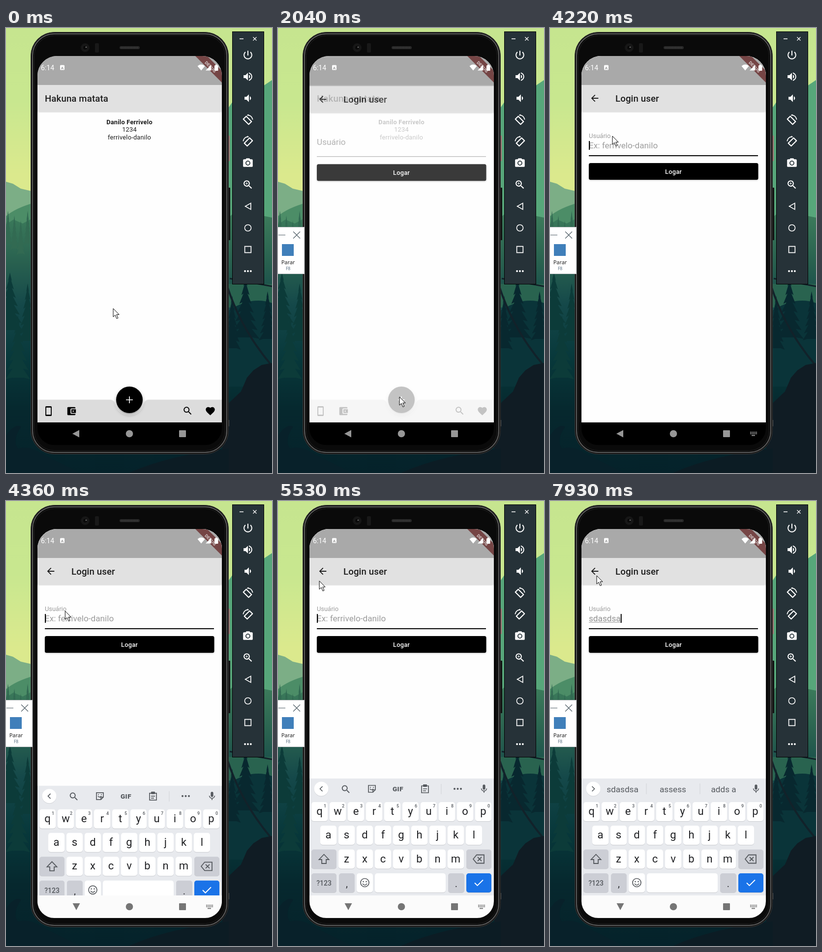
These frames come from a looping animation (541x906 px, 8 s). An HTML page:

```html
<!DOCTYPE html>
<html lang="pt">
<head>
<meta charset="utf-8">
<title>Login</title>
<style>
html, body { margin: 0; width: 100%; height: 100%; overflow: hidden; background: #05232b; }
svg { display: block; font-family: Roboto, sans-serif; }
.mid { text-anchor: middle; }
</style>
</head>
<body>
<svg id="stage" width="541" height="906" viewBox="0 0 541 906"></svg>
<script>
const stage = document.getElementById('stage');
const rect = (x, y, w, h, fill, r = 0, more = '') =>
  `<rect x="${x}" y="${y}" width="${w}" height="${h}" rx="${r}" fill="${fill}" ${more}/>`;
const circle = (x, y, r, fill, more = '') => `<circle cx="${x}" cy="${y}" r="${r}" fill="${fill}" ${more}/>`;
const path = (d, fill, more = '') => `<path d="${d}" fill="${fill}" ${more}/>`;
const line = (d, color, w = 1, more = '') => path(d, 'none', `stroke="${color}" stroke-width="${w}" ${more}`);
const text = (s, x, y, size, fill, more = '') =>
  `<text x="${x}" y="${y}" font-size="${size}" fill="${fill}" ${more}>${s}</text>`;
const mid = (s, x, y, size, fill, more = '') => text(s, x, y, size, fill, 'class="mid" ' + more);
// 24-unit icon centred on x, y
const icon = (body, x, y, size, fill) =>
  `<g transform="translate(${x} ${y}) scale(${size / 24}) translate(-12 -12)" fill="${fill}">${body}</g>`;
const glyph = d => `<path d="${d}"/>`;

const lens = glyph('M15.5 14h-.79l-.28-.27C15.41 12.59 16 11.11 16 9.5 16 5.91 13.09 3 9.5 3S3 5.91 3 9.5 5.91 16 9.5 16c1.61 0 3.09-.59 4.23-1.57l.27.28v.79l5 4.99L20.49 19l-4.99-5zm-6 0C7.01 14 5 11.99 5 9.5S7.01 5 9.5 5 14 7.01 14 9.5 11.99 14 9.5 14z');
const turn = line('M8.500 4.500L2.500 10.500L13.500 21.500L19.500 15.500Z', '#fff', 2.2, 'stroke-linejoin="round"') +
  line('M10.500 2.500Q19.500 1.500 22 11.500M13.500 1L10.500 2.500', '#fff', 1.8);
const icons = {
  phone: glyph('M17 1H7c-1.1 0-2 .9-2 2v18c0 1.1.9 2 2 2h10c1.1 0 2-.9 2-2V3c0-1.1-.9-2-2-2zM17 20H7V4h10v16z'),
  wallet: glyph('M21 18v1c0 1.1-.9 2-2 2H5c-1.11 0-2-.9-2-2V5c0-1.1.89-2 2-2h14c1.1 0 2 .9 2 2v1h-9c-1.11 0-2 .9-2 2v8c0 1.1.89 2 2 2h9zm-9-2h10V8H12v8zm4-2.5c-.83 0-1.5-.67-1.5-1.5s.67-1.5 1.5-1.5 1.5.67 1.5 1.5-.67 1.5-1.5 1.5z'),
  heart: glyph('M12 21.35l-1.45-1.32C5.4 15.36 2 12.28 2 8.5 2 5.42 4.42 3 7.5 3c1.74 0 3.41.81 4.5 2.09C13.09 3.81 14.76 3 16.5 3 19.58 3 22 5.42 22 8.5c0 3.78-3.4 6.86-8.55 11.54L12 21.35z'),
  back: glyph('M20 11H7.83l5.59-5.59L12 4l-8 8 8 8 1.41-1.41L7.83 13H20v-2z'),
  mic: glyph('M12 14c1.66 0 3-1.34 3-3V5c0-1.66-1.34-3-3-3S9 3.34 9 5v6c0 1.66 1.34 3 3 3zm5.3-3c0 3-2.54 5.1-5.3 5.1S6.7 14 6.7 11H5c0 3.41 2.72 6.23 6 6.72V21h2v-3.28c3.28-.48 6-3.3 6-6.72h-1.7z')
};
const tools = [
  glyph('M13 3h-2v10h2V3zm4.83 2.17l-1.42 1.42C17.99 7.86 19 9.81 19 12c0 3.87-3.13 7-7 7s-7-3.13-7-7c0-2.19 1.01-4.14 2.58-5.42L6.17 5.17C4.23 6.82 3 9.26 3 12c0 4.97 4.03 9 9 9s9-4.03 9-9c0-2.74-1.23-5.18-3.17-6.83z'),
  glyph('M3 9v6h4l5 5V4L7 9H3zm13.5 3c0-1.77-1.02-3.29-2.5-4.03v8.05c1.48-.73 2.5-2.25 2.5-4.02zM14 3.23v2.06c2.89.86 5 3.54 5 6.71s-2.11 5.85-5 6.71v2.06c4.01-.91 7-4.49 7-8.77s-2.99-7.86-7-8.77z'),
  glyph('M18.5 12c0-1.77-1.02-3.29-2.5-4.03v8.05c1.48-.73 2.5-2.25 2.5-4.02zM5 9v6h4l5 5V4L9 9H5z'),
  turn,
  `<g transform="matrix(-1 0 0 1 24 0)">${turn}</g>`,
  circle(12, 12, 3.2, '#fff') + glyph('M9 2L7.17 4H4c-1.1 0-2 .9-2 2v12c0 1.1.9 2 2 2h16c1.1 0 2-.9 2-2V6c0-1.1-.9-2-2-2h-3.17L15 2H9zm3 15c-2.76 0-5-2.24-5-5s2.24-5 5-5 5 2.24 5 5-2.24 5-5 5z'),
  lens + glyph('M12 10h-2v2H9v-2H7V9h2V7h1v2h2v1z'),
  line('M18 5.500V18.500L6.500 12Z', '#fff', 1.7),
  circle(12, 12, 6.7, 'none', 'stroke="#fff" stroke-width="1.6"'),
  line('M5.500 5.500H18.500V18.500H5.500Z', '#fff', 1.7),
  [6, 12, 18].map(x => circle(x, 12, 2, '#fff')).join('')
];

const gradient = (id, stops) => `<linearGradient id="${id}" x2="0" y2="906" gradientUnits="userSpaceOnUse">` +
  stops.map(([y, c]) => `<stop offset="${y / 906}" stop-color="${c}"/>`).join('') + '</linearGradient>';
const shadow = (id, dy, blur, opacity) =>
  `<filter id="${id}" x="-20%" y="-20%" width="140%" height="160%"><feDropShadow dx="0" dy="${dy}" stdDeviation="${blur}" flood-opacity="${opacity}"/></filter>`;

function pine(x, y, w, h, fill) {
  let left = '', right = '';
  for (let i = 1; i <= 7; i++) {
    const r = w / 2 * i / 7, by = y + h * i / 7;
    right += `L${x + r} ${by}L${x + r * .5} ${by - 3}`;
    left = `L${x - r * .5} ${by - 3}L${x - r} ${by}` + left;
  }
  return path(`M${x} ${y}${right}${left}Z`, fill);
}

const scenery =
  rect(0, 0, 541, 906, 'url(#sky)') +
  path('M0 313L14 317 30 327 60 334V500H0Z', '#7cae86') +
  path('M440 180L461 150 500 138 526 116 541 106V420H440Z', '#57a67a') +
  path('M0 383Q20 366 60 355V460H0Z', '#4c8d67') +
  path('M0 400L15 390 34 398 60 384 440 395 470 372 541 386V906H0Z', 'url(#forest)') +
  [4, 17, 30, 44].map((x, i) => pine(x, 372 + i % 3 * 10, 17, 70, '#326a52')).join('') +
  [[8, 498, 56, 120], [44, 520, 40, 120], [24, 585, 50, 130]].map(a => pine(...a, '#0c3b39')).join('') +
  rect(453, 521, 88, 48, '#29634f') +
  path('M453 575Q500 545 541 560V730H453Z', '#0a3439') +
  [[487, 508, 58, 125], [532, 536, 36, 100], [460, 545, 35, 110]].map(a => pine(...a, '#08282f')).join('') +
  line('M440 490Q466 600 541 688', '#12222a', 4) + line('M455 510L541 526', '#12222a', 3) +
  path('M440 776L478 740 490 712 503 697 520 686 541 682V906H440Z', '#101c24') +
  path('M0 830Q18 804 31 812 12 838 24 856 50 850 75 868L150 906H0Z', '#08212a') +
  path('M250 906Q330 870 453 856V906Z', '#0c1c24');

const phone =
  rect(451, 219, 4, 52, '#a96f73', 1) + rect(451, 325, 5, 107, '#111', 1) + rect(452, 798, 2, 13, '#555') +
  rect(50.5, 8.500, 402, 859, '#141414', 48, 'stroke="#383838"') +
  rect(54, 12, 395, 852, '#0b0b0b', 44, 'stroke="#5c5c5c" stroke-width="2"') +
  rect(57.5, 15.500, 388, 845, '#0a0a0a', 41, 'stroke="#202020"') +
  rect(231, 37, 41, 6, '#292929', 3) + line('M234 40H269', '#444', 3, 'stroke-dasharray="1 2"') +
  circle(161, 40, 9, '#161616') + circle(161, 40, 5, '#0a0a0a', 'stroke="#222"') + circle(163, 39, 1.5, '#666') +
  rect(181, 31, 8, 19, '#191919', 2);

const toolbar =
  rect(460.5, 7.500, 64, 514, '#263238', 0, 'stroke="#000"') +
  line('M475 22H483M502.500 18.500L509.500 25.500M509.500 18.500L502.500 25.500', '#fff', 1.3) +
  tools.map((b, i) => icon(b, 492, 55 + 44 * i, 23.5, '#fff')).join('');

const user = 'ferrivelo-danilo';
const ink = '#1d1d1d';
const header = rect(64, 57, 375, 746, '#fefefe') +
  rect(64, 116, 375, 53.5, '#e1e1e1', 0, 'filter="url(#soft)"') + rect(64, 57, 375, 59, '#a9a9a9');
const heading = 'font-weight="500" letter-spacing=".14"';
const spaced = 'letter-spacing=".23"';

const home = header +
  text('Hakuna matata', 79, 150, 18.6, ink, heading) +
  mid('Danilo Ferrivelo', 251, 196, 12.8, ink, 'font-weight="700" ' + spaced) +
  mid('1234', 251, 211, 12.8, ink, spaced) + mid(user, 251, 226.5, 12.8, ink, spaced) +
  path('M64 757H212Q219 757 221 764A30.500 30.500 0 0 0 281 764Q283 757 290 757H439V803H64Z', '#dcdcdc', 'filter="url(#soft)"') +
  circle(251, 757, 27, '#000', 'filter="url(#lift)"') +
  line('M244 757H258M251 750V764', '#fff', 1.6) +
  icon(icons.phone, 86.5, 780, 22, '#000') + icon(icons.wallet, 133, 780, 22, '#000') +
  icon(lens, 369.5, 779.5, 22, '#000') + icon(icons.heart, 415.5, 780, 22, '#000');

const login = header +
  icon(icons.back, 91, 143, 22, ink) +
  text('Login user', 133, 150, 18.6, ink, heading) +
  text('Usuário', 0, 0, 17.2, '#9b9b9b', 'id="label"') +
  text('Ex: ' + user, 79, 244.5, 17.2, '#9b9b9b', 'id="hint"') +
  text('', 79, 244.5, 17.2, '#8f8f8f', 'id="typed"') +
  rect(79, 246.5, 0, 1, '#8f8f8f', 0, 'id="mark"') + rect(0, 230, 2, 18, '#000', 0, 'id="caret"') +
  rect(79, 259, 344, 1, '#8c8c8c', 0, 'id="rule"') +
  rect(79, 275, 344.5, 34, '#000', 3.5, 'filter="url(#soft)"') +
  mid('Logar', 251, 297, 12.8, '#fff', 'font-weight="500" ' + spaced);

const gray = '#55595e';
const key = (x, y, w, fill = '#fff') => rect(x, y + 1, w, 39, '#c9cbd0', 5) + rect(x, y, w, 39, fill, 5);
const row = (letters, x0, y) => [...letters].map((c, i) =>
  key(x0 + 37 * i, y, 33) + mid(c, x0 + 37 * i + 16.5, y + 26, 22, '#202124')).join('');
const keyboard = rect(64, 565, 375, 240, '#e8eaee') +
  circle(88, 587, 14.5, '#cfd1d6') + circle(88, 586, 14.5, '#fff') + icon(icons.mic, 419, 586, 21, gray) +
  `<g id="shortcuts">` + line('M90.500 581L85.500 586L90.500 591', gray, 1.7) + icon(lens, 138, 587, 22, gray) +
  line('M184 579H198V588L193 593H184ZM198 588H193V593M187 586Q190 590 194 586', gray, 1.7) +
  circle(188, 583, 1, gray) + circle(194, 583, 1, gray) +
  mid('GIF', 244, 591, 13.5, gray, 'font-weight="900" letter-spacing=".5"') +
  line('M292 580H306V594H292ZM295 586H303M295 590H301', gray, 1.7) + rect(295, 577, 8, 5, gray, 1) +
  rect(331.5, 576, 1, 21, '#cfd1d6') + [359, 365.5, 372].map(x => circle(x, 586, 2, gray)).join('') + '</g>' +
  '<g id="words">' + line('M85.500 581L90.500 586L85.500 591', gray, 1.7) +
  rect(195.5, 575, 1, 22, '#cfd1d6') + rect(304.5, 575, 1, 22, '#cfd1d6') +
  [147.5, 250, 353].map(x => mid('', x, 592.5, 17.2, gray)).join('') + '</g>' +
  row('qwertyuiop', 68, 613) +
  [...'1234567890'].map((n, i) => mid(n, 95.5 + 37 * i, 624, 9, gray, 'font-weight="500"')).join('') +
  row('asdfghjkl', 86, 661) + row('zxcvbnm', 123, 709.5) +
  key(68, 709.5, 51, '#ccced5') + line('M93.500 719.500L103.500 730H98V738H89V730H83.500Z', gray, 1.8) +
  key(383, 709.5, 51, '#ccced5') + line('M397 729L404 720.500H419V737.500H404ZM406 725L414 733M414 725L406 733', gray, 1.8) +
  key(68, 758, 51, '#ccced5') + mid('?123', 93.5, 783, 14, gray, 'font-weight="500"') +
  key(124, 758, 32, '#ccced5') + mid(',', 140, 786, 20, '#303236') +
  key(160, 758, 33) + circle(176.5, 777, 8.5, 'none', `stroke="${gray}" stroke-width="1.7"`) +
  circle(173.5, 775, 1.3, gray) + circle(179.5, 775, 1.3, gray) + line('M172 779Q176.500 785 181 779', gray, 1.6) +
  key(197, 758, 144) + key(346, 758, 33, '#ccced5') + mid('.', 362.5, 786, 20, '#303236') +
  key(383, 758, 51, '#1a73e8') + line('M400 777.500L405.500 783L417 771.500', '#fff', 1.9);

const dots = [0, 1, 2, 3, 4].map(i => [0, 1].map(j => rect(407 + 3 * i, 822 + 3 * j, 2, 2, 'currentColor')).join('')).join('');
const nav = '<g id="nav">' + rect(64, 803, 375, 46, '#000', 0, 'id="strip"') +
  path('M135 826L149 818.500V833.500Z', 'currentColor', 'id="backKey"') +
  circle(251, 826, 7.3, 'currentColor') + rect(352, 819, 14, 14, 'currentColor', 1) +
  `<g id="switcher">${dots}${rect(410, 828.5, 7, 2, 'currentColor')}</g></g>`;

const status =
  path('M385 57H409L439 87V111Z', '#713d3d', 'opacity=".92"') +
  mid('DEBUG', 0, 3.3, 9, '#c9baba', 'font-weight="900" transform="translate(416 79) rotate(45)"') +
  text('6:14', 71, 85.5, 14, '#fff') + rect(110, 75.500, 9, 10, '#fff', 1.5) +
  mid('A', 114.5, 83.5, 8, '#999', 'font-weight="700"') +
  path('M389.500 77.500Q397 71 404.500 77.500L397 86.500Z', '#fff') + path('M406 86.500L417 75.500V86.500Z', '#fff') +
  rect(424, 76, 7.500, 11, '#fff', 1) + rect(426, 74.500, 3.500, 2, '#fff');

const recorder = '<g id="recorder">' + rect(-1, 405.5, 54.5, 95, '#fff', 0, 'stroke="#b9bdc0"') +
  line('M1 421.500H15M31 414.500L45 428.500M45 414.500L31 428.500', '#4f5d66', 1.1) + rect(8, 440, 24, 24, '#407fba') +
  `<g font-family="Open Sans, sans-serif">${mid('Parar', 20.5, 481, 11, '#111')}${mid('F8', 20.5, 493, 8.5, '#4d6478')}</g></g>`;

stage.innerHTML = '<defs>' +
  gradient('sky', [[0, '#c6e58f'], [150, '#c8e78f'], [300, '#dbe98d']]) +
  gradient('forest', [[380, '#3c7b5b'], [480, '#28604f'], [560, '#15494a'], [680, '#07373a'], [780, '#06282e'], [906, '#05222a']]) +
  shadow('soft', 1, 1.5, .25) + shadow('lift', 3.5, 3, .4) +
  '<clipPath id="screen"><path d="M64 97A40 40 0 0 1 104 57H399A40 40 0 0 1 439 97V815A34 34 0 0 1 405 849H98A34 34 0 0 1 64 815Z"/></clipPath></defs>' +
  scenery + phone + toolbar +
  `<g clip-path="url(#screen)"><g id="home">${home}</g><g id="login">${login}</g><g id="keyboard">${keyboard}</g>${nav}${status}</g>` +
  recorder + circle(0, 0, 12, '#fff000', 'id="press" fill-opacity=".49"') +
  path('M0 0V17L4 13.300L7 20.500L9.800 19.300L6.800 12.300H12Z', '#fff', 'id="pointer" stroke="#000"');

const $ = id => document.getElementById(id);
const words = $('words').querySelectorAll('text');
const set = (id, attrs) => { for (const k in attrs) $(id).setAttribute(k, attrs[k]); };
const show = (id, on) => set(id, { visibility: on ? 'visible' : 'hidden' });
const span = (t, a, b) => Math.min(1, Math.max(0, (t - a) / (b - a)));
const easeOut = p => 1 - (1 - p) ** 3;
const mix = (a, b, p) => a + (b - a) * p;

// time, x, y of the pointer tip
const route = [
  [0, 218, 571], [70, 222, 580], [420, 288, 700], [640, 288, 788], [820, 262, 788], [890, 261, 787],
  [1300, 247, 751], [2370, 247, 751], [2510, 205, 580], [2650, 105, 265], [2790, 50, 128],
  [2900, 36, 131], [3060, 60, 158], [3200, 118, 150], [3340, 134, 252], [3470, 127, 220],
  [4220, 127, 220], [4430, 117, 226], [4760, 117, 226], [5000, 190, 338], [5200, 204, 342],
  [5450, 110, 200], [5600, 62, 131], [5670, 64, 132], [5810, 89, 144], [6300, 89, 144],
  [6550, 95, 152], [8000, 95, 152]
];
const strokes = [6820, 6960, 7100, 7240, 7400, 7510, 7720];
const blinks = [4050, 4480, 5060, 5560, 6080, 6550, 6820];

function draw(t) {
  const i = Math.max(1, route.findIndex(r => r[0] > t));
  const [t0, x0, y0] = route[i - 1], [t1, x1, y1] = route[i];
  const p = span(t, t0, t1), x = mix(x0, x1, p), y = mix(y0, y1, p);
  set('pointer', { transform: `translate(${x} ${y})` });
  set('press', { cx: x - 1, cy: y });
  show('press', (t >= 1695 && t < 1840) || (t >= 3665 && t < 3810));
  show('recorder', t >= 70);

  const enter = span(t, 1810, 2110);
  set('login', { opacity: enter, transform: `translate(0 ${186 * (1 - easeOut(enter))})` });

  const focus = easeOut(span(t, 4040, 4300));
  set('label', { transform: `translate(79 ${mix(236, 223.5, focus)}) scale(${mix(1, .75, focus)})` });
  set('hint', { opacity: focus * (1 - span(t, 6830, 7000)) });
  set('rule', focus ? { height: 2, fill: '#000' } : { height: 1, fill: '#8c8c8c' });

  const count = strokes.filter(s => s <= t).length;
  const typed = 'sdasdsa'.slice(0, count);
  $('typed').textContent = typed;
  const width = count ? $('typed').getComputedTextLength() : 0;
  set('mark', { width });
  set('caret', { x: 79 + width });
  show('caret', blinks.filter(b => b <= t).length % 2);

  const rise = easeOut(span(t, 4240, 4440));
  set('keyboard', { transform: `translate(0 ${240 * (1 - rise)})` });
  show('keyboard', rise > 0);
  show('shortcuts', rise > 0 && t < 7030);
  show('words', t >= 7030);
  [typed, ...(t < 7720 ? ['sad', 'sea'] : ['assess', 'adds a'])].forEach((w, n) => words[n].textContent = w);

  set('strip', { fill: rise > 0 ? '#fbfbfb' : '#000' });
  set('nav', { color: rise > 0 ? '#757575' : '#979797' });
  set('backKey', { transform: rise > 0 ? 'rotate(-90 142.5 825.5)' : '' });
  show('switcher', t >= 4150);
}

function tick() {
  draw(performance.now() % 8000);
  requestAnimationFrame(tick);
}
tick();
</script>
</body>
</html>
```
